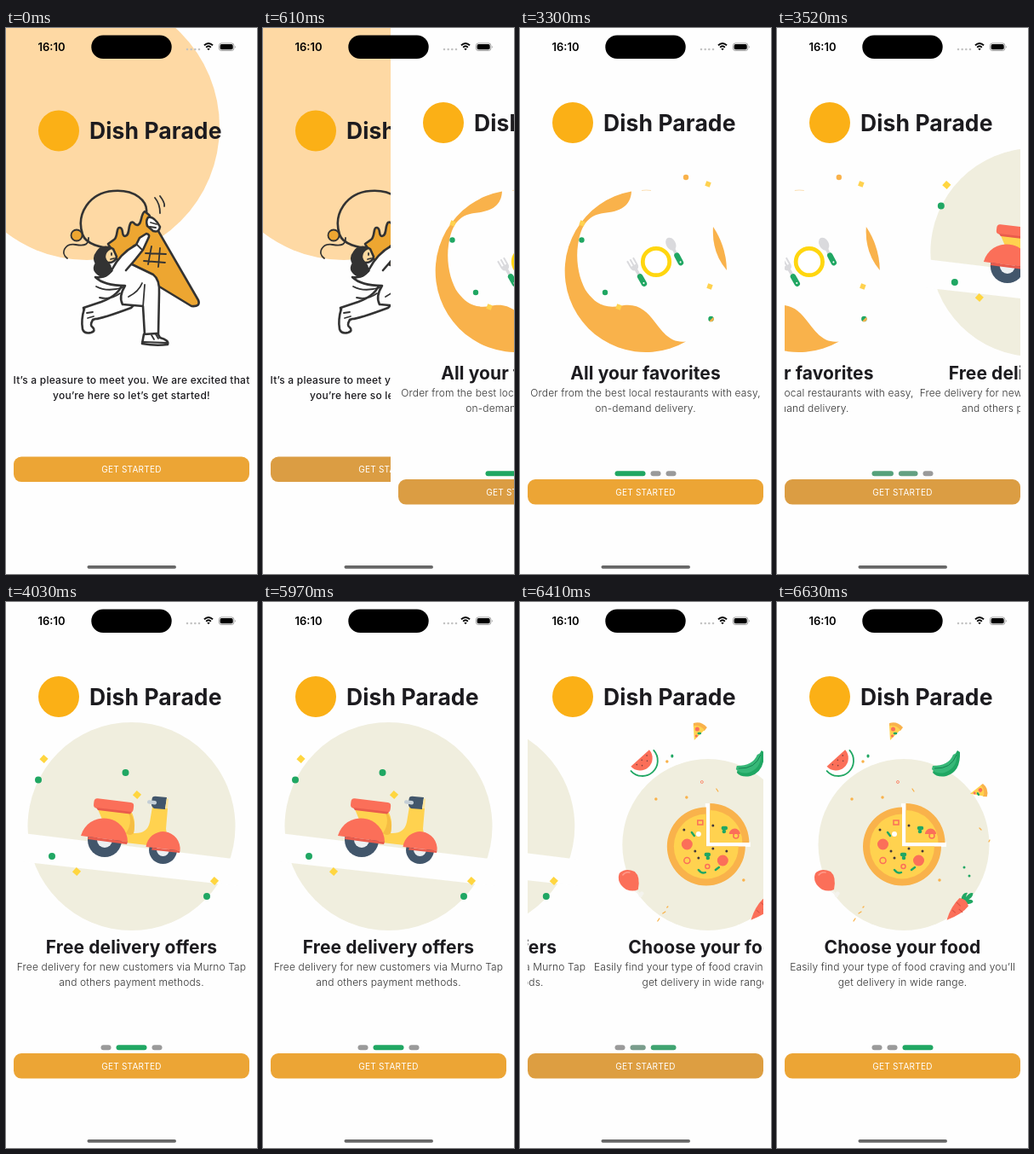
Recreate the animation shown at these times as an HTML page. Size 295 by 640 pixels, loop 8000 ms.

```html
<!DOCTYPE html>
<html lang="en">
<head>
<meta charset="utf-8">
<title>Food ordering onboarding</title>
<style>
html, body { margin: 0; width: 100%; height: 100%; overflow: hidden; background: #fefefe; }
svg { display: block; width: 100vw; height: 100vh; }
text { font-family: Inter, "Liberation Sans", sans-serif; fill: #1c1b1f; }
.mid { text-anchor: middle; }
.brand { font-size: 26.5px; font-weight: 700; letter-spacing: .1px; }
.head { font-size: 21px; font-weight: 700; letter-spacing: .1px; }
.intro { font-size: 12px; font-weight: 500; letter-spacing: .23px; }
.body { font-size: 12px; font-weight: 300; letter-spacing: .14px; fill: #333; }
.cta { font-size: 10px; letter-spacing: .25px; fill: #fff; }
.clock { font-size: 13px; font-weight: 600; fill: #000; }
.ink { fill: none; stroke: #333; stroke-width: 2.6; stroke-linecap: round; stroke-linejoin: round; }
.fine { stroke-width: 1.8; }
.white { fill: #fefefe; }
.cream { fill: #f0eede; }
.yellow { fill: #ffd24f; }
.amber { fill: #f9b24b; }
.green { fill: #20a763; }
.red { fill: #fb6f59; }
.navy { fill: #42566b; }
.dots { fill: none; stroke: #20a763; stroke-linecap: round; }
.dots.a { stroke: #f9b24b; }
</style>
</head>
<body>
<svg viewBox="0 0 295 640" preserveAspectRatio="none">
<defs>
  <clipPath id="view"><rect x="9" y="138" width="277" height="320"/></clipPath>
  <g id="brand">
    <circle cx="62" cy="111" r="24" fill="#fbb016"/>
    <text class="brand" x="98" y="120.500">Dish Parade</text>
  </g>
  <rect id="gem" x="-3.600" y="-3.600" width="7.200" height="7.200" transform="rotate(42)" fill="#ffd640"/>
  <rect id="chip" x="-2.900" y="-2.900" width="5.800" height="5.800" transform="rotate(20)" fill="#ffd24f"/>
  <g id="button">
    <rect class="fill" x="9" width="277" height="29.600" rx="9"/>
    <text class="cta mid" x="147.500" y="18.500">GET STARTED</text>
  </g>
  <g id="wedge">
    <path class="amber" d="M-7-10Q2-13 9-5L6-1-7-6Z"/>
    <path class="yellow" d="M-7-7Q1-8 6-2L-6 10Z"/>
    <path class="dots" stroke-width="2.500" d="M-1 2h2"/>
    <path class="red" d="M-5-3a2.500 2.500 0 1 1 5 0a2.500 2.500 0 1 1-5 0M-5 5a1.500 1.500 0 1 1 3 0a1.500 1.500 0 1 1-3 0"/>
  </g>
</defs>

<g id="home">
  <rect class="white" width="295" height="640"/>
  <circle cx="95" cy="116" r="156" fill="#fed9a4"/>
  <use href="#brand" y="9.500"/>
  <g class="ink">
    <!-- scoop, cone and cherry -->
    <path d="M90 242C82 218 98 193 126 191C152 189 167 203 165 217M90 242C94 254 114 258 124 258"/>
    <path fill="#eda631" d="M163 215C158 218 160 231 154 231C149 230 151 226 147 228C143 232 146 243 140 244C135 244 139 235 134 234C129 233 132 245 127 248Q123 251 120 253L132 274L218 326Q229 327 226 319L168 219Z"/>
    <circle class="fine" cx="83" cy="243" r="6.500" fill="#eda631"/>
    <path class="fine" d="M72 270C63 263 70 252 82 254S97 253 97 246M175 199Q181 206 181 217M181 197Q187 205 186 209"/>
    <path class="fine" d="M171 256L167 277M181 258L179 280M164 264L188 265M162 273L187 275"/>
    <!-- back leg -->
    <path class="white" d="M138 297Q134 313 112 321L91 328L96 344L105 341Q112 341 147 328L164 310"/>
    <path class="white" d="M92 329Q88 342 90 353Q92 359 100 357Q106 355 102 351Q98 349 102 342"/>
    <path class="fine" d="M95 334L102 333M96 340L103 338"/>
    <!-- torso and front leg -->
    <path class="white" d="M124 285C126 278 138 276 148 277L173 289Q181 295 180 311L179 359L163 360L161 326L137 324Q132 315 140 302C122 302 112 299 105 292Q116 294 124 285Z"/>
    <path class="white" d="M162 359L160 370Q176 373 190 371Q192 366 181 363L178 358Z"/>
    <path class="fine" d="M160 368L189 369M171 360L174 365M176 359L179 364"/>
    <path class="fine" d="M106 303Q119 310 138 304M110 316Q123 319 134 311M160 299Q156 309 144 315M163 301L161 327"/>
    <!-- head and arms -->
    <path fill="#fbd9a0" d="M111 263Q118 254 126 259L130 268Q128 276 119 275Z"/>
    <path fill="#333" d="M107 263Q112 254 123 258Q113 263 117 273Q126 280 121 287Q116 294 109 289Q101 283 106 276Q102 269 107 263Z"/>
    <path class="fine" d="M124 264L124 266M123 271L127 270"/>
    <path class="white" d="M124 284Q134 264 153 254L157 246L165 241Q170 242 167 247L161 260Q151 273 141 284"/>
    <path class="white" d="M167 222Q174 220 181 233Q180 240 173 238L166 232Q164 226 167 222Z"/>
    <path class="fine" d="M154 254L160 260M170 228L177 230M169 233L176 234"/>
  </g>
  <g class="intro mid">
    <text x="147.500" y="416.500">It’s a pleasure to meet you. We are excited that</text>
    <text x="147.500" y="434.500">you’re here so let’s get started!</text>
  </g>
  <use href="#button" y="502.500"/>
</g>

<g id="tour">
  <rect class="white" width="295" height="640"/>
  <use href="#brand"/>
  <g clip-path="url(#view)"><g id="strip">

    <g>
      <path class="amber" d="M131 191.500A95 95 0 1 0 195 367.400C176 370 167 355 158 344C149 332 138 321 117 326C96 329 88 321 79 310C70 297 64 272 69 249C73 229 82 219 98 217C118 215 130 209 131 191.500Z"/>
      <path class="amber" d="M227 233A95 95 0 0 1 243 284Q225 263 227 233Z"/>
      <path d="M143 190.500Q148 189.500 154 190.500" fill="none" stroke="#f9c981" stroke-width=".6"/>
      <circle cx="160" cy="274" r="15.700" fill="#fff" stroke="#ffd60f" stroke-width="4.800"/>
      <g transform="translate(138 286) rotate(-30)">
        <path d="M-5-17V-9Q-5-4-1.800-3V4H1.800V-3Q5-4 5-9V-17H3V-9H1V-17H-1V-9H-3V-17Z" fill="#dadadd"/>
        <rect class="green" x="-3.300" y="3" width="6.600" height="16" rx="3.300"/>
        <circle cy="15" r="1" fill="#fff"/>
      </g>
      <g transform="translate(182 262) rotate(-28)">
        <ellipse cy="-10" rx="5.500" ry="8" fill="#dadadd"/>
        <path d="M-1.800-4H1.800V4H-1.800Z" fill="#dadadd"/>
        <rect class="green" x="-3.300" y="2" width="6.600" height="16" rx="3.300"/>
        <circle cy="14" r="1" fill="#fff"/>
      </g>
      <path class="dots" stroke-width="6.400" d="M72.500 248.500h0M100 310h0M224.500 341h0"/>
      <path class="dots a" stroke-width="6.400" d="M195 175h0"/>
      <path class="amber" d="M227 339A3.200 3.200 0 0 1 222.500 343.500Z"/>
      <use href="#chip" transform="translate(221 183)"/>
      <use href="#chip" transform="translate(73 229)"/>
      <use href="#chip" transform="translate(116 327)"/>
      <use href="#chip" transform="translate(223 303)"/>
      <g class="mid">
        <text class="head" x="147.500" y="412">All your favorites</text>
        <text class="body" x="147.500" y="432">Order from the best local restaurants with easy,</text>
        <text class="body" x="147.500" y="450">on-demand delivery.</text>
      </g>
    </g>

    <g transform="translate(277)">
      <circle class="cream" cx="147.500" cy="263" r="122"/>
      <path class="white" d="M20 271L275 302V333L20 304.500Z"/>
      <circle class="navy" cx="116" cy="279" r="20"/>
      <circle cx="116" cy="279" r="9" fill="#eceff1"/>
      <circle class="navy" cx="184.500" cy="290.500" r="16.500"/>
      <circle cx="184.500" cy="290.500" r="7.500" fill="#eceff1"/>
      <path class="yellow" d="M108 243L148 247Q153 257 150 271Q166 272 169 258L172 240L190 242L188 266L190 277L166 285L140 282L116 262Z"/>
      <path d="M146 247Q153 257 150 271Q146 275 141 271Q149 259 144 247Z" fill="#f5bd43"/>
      <path class="red" d="M88 274A28 28 0 0 1 143 281Z"/>
      <path class="red" d="M164.500 287A20 20 0 0 1 204.500 291.500Z"/>
      <path d="M97 275L143 281L142 284L96 278ZM172 288L204.500 291.500L204 294L171 290.500Z" fill="#e95b4c"/>
      <rect class="red" x="103" y="232.500" width="47" height="11.500" rx="4" transform="rotate(7 126 239)"/>
      <path d="M106 241L148 246L146 248.500L108 244Z" fill="#e95b4c"/>
      <path class="navy" d="M172 229Q174 227 178 228L189 229L187 243L174 242Q169 240 172 229Z"/>
      <path d="M189 230L191 231 190 242 187 242Z" fill="#ffe59a"/>
      <rect x="166" y="232.500" width="11" height="4.500" rx="2" transform="rotate(7 171 235)" fill="#c4ced6"/>
      <path class="dots" stroke-width="8" d="M38 208.500h0M140.500 200h0M54 298h0M236 345h0"/>
      <use href="#gem" transform="translate(44.500 184)"/>
      <use href="#gem" transform="translate(154 226)"/>
      <use href="#gem" transform="translate(83 316)"/>
      <use href="#gem" transform="translate(245 327)"/>
      <g class="mid">
        <text class="head" x="147.500" y="412">Free delivery offers</text>
        <text class="body" x="147.500" y="432">Free delivery for new customers via Murno Tap</text>
        <text class="body" x="147.500" y="450">and others payment methods.</text>
      </g>
    </g>

    <g transform="translate(554)">
      <circle class="cream" cx="149" cy="284.500" r="100.500"/>
      <!-- pizza -->
      <path class="white" d="M146 236H151.500V281.500H199V287H146Z"/>
      <path class="amber" d="M147 286.500V240.500A46 46 0 1 0 193 286.500Z"/>
      <path class="yellow" d="M147 286.500V248.500A38 38 0 1 0 185 286.500Z"/>
      <path class="amber" d="M151.500 282V236A46 46 0 0 1 197.500 282Z"/>
      <path class="yellow" d="M151.500 282V244A38 38 0 0 1 189.500 282Z"/>
      <path class="red" d="M118 284a6.500 6.500 0 1 0 13 0a6.500 6.500 0 1 0-13 0M160 303a6.500 6.500 0 1 0 13 0a6.500 6.500 0 1 0-13 0M174 272a6.500 6.500 0 0 1 13 0Z"/>
      <path fill="none" stroke="#fb6f59" stroke-width="1.500" d="M137 256h6v5h-6ZM121 303a3.500 3.500 0 1 0 7 0a3.500 3.500 0 1 0-7 0M146 310a2.500 2.500 0 1 0 5 0a2.500 2.500 0 1 0-5 0M179 274a3 3 0 1 0 6 0a3 3 0 1 0-6 0"/>
      <path class="dots" stroke-width="4.500" d="M167 265h3M168 269h0M147 296h3M149 300h0"/>
      <path class="dots" stroke-width="2.500" d="M138 314Q142 319 146 317M130 270l3 4M158 314l4-3"/>
      <circle cx="138" cy="272" r="3" fill="#fff"/>
      <path fill="none" stroke="#43383a" stroke-width="3" stroke-linecap="round" d="M121 267h0M155 262h0M138 300h0M155 289h0M171 292h0M134 292h0"/>
      <!-- watermelon -->
      <g transform="translate(72 186) rotate(-42)">
        <path class="dots" stroke-width="1.800" d="M-18 0A18 18 0 0 0 18 0"/>
        <path class="red" d="M-14.500-4H14.500A14.500 14.500 0 0 1-14.500-4Z"/>
        <path fill="none" stroke="#743c3c" stroke-width="1.500" stroke-linecap="round" d="M-8-1h0M0-1h0M8-1h0M-4 4h0M4 4h0"/>
      </g>
      <use href="#wedge" transform="translate(139 152)"/>
      <use href="#wedge" transform="translate(238 224) rotate(55) scale(.95)"/>
      <!-- bananas -->
      <path class="green" d="M212 174L215 176Q216 199 199 204Q188 206 183 200L184 197Q207 197 208 181Z"/>
      <path fill="#37b878" d="M211 177Q213 194 197 200Q187 202 182 196L183 192Q202 192 207 179Z"/>
      <path d="M185 195Q205 196 211 179" fill="none" stroke="#168452"/>
      <!-- carrot -->
      <g transform="translate(215 357) rotate(42)">
        <path class="green" d="M-5-8Q-9-15-4-18Q-4-15-2-13Q-3-20 1-22Q4-18 2-13Q6-17 8-14Q7-9 4-8Z"/>
        <path class="red" d="M-7-7Q0-12 7-7Q8 5-1 22Q-8 7-7-7Z"/>
        <path d="M-6-1H0M7 3H1M-4 9H1" fill="none" stroke="#dc5143"/>
      </g>
      <!-- drumstick -->
      <path d="M62 335L69 341Q70 338 73 340Q75 342 72 344Q72 347 69 346Q67 345 68 343L60 337Z" fill="#f4f3ed"/>
      <path class="red" d="M45 318Q52 311 63 316Q70 322 67 337Q61 340 53 337Q41 329 45 318Z"/>
      <path d="M49 320Q52 316 57 317" fill="none" stroke="#ff9989" stroke-width="1.500" stroke-linecap="round"/>
      <!-- crumbs -->
      <path class="dots a" stroke-width="3.500" d="M88 231h0M124 229h0M137 328h0M191 326h0M101 187h0"/>
      <path class="dots a" stroke-width="1.300" d="M159 219l2 3M238 265l2 2M249 281l1-2M96 365l3-2M90 374l2-3M101 358l1-1"/>
      <path class="dots" stroke-width="3" d="M107 180l0 1M220 311h0M226 321h0"/>
      <circle cx="142" cy="211" r="1.500" fill="none" stroke="#fb8c70"/>
      <g class="mid">
        <text class="head" x="147.500" y="412">Choose your food</text>
        <text class="body" x="147.500" y="432">Easily find your type of food craving and you’ll</text>
        <text class="body" x="147.500" y="450">get delivery in wide range.</text>
      </g>
    </g>
  </g></g>
  <g id="pager">
    <rect y="519.300" height="6" rx="3"/><rect y="519.300" height="6" rx="3"/><rect y="519.300" height="6" rx="3"/>
  </g>
  <use href="#button" y="529"/>
</g>

<!-- system chrome -->
<text class="clock" x="37.500" y="27">16:10</text>
<rect x="100.300" y="8.400" width="94.400" height="27.700" rx="13.800"/>
<path d="M213 25h0M217.700 25h0M222.300 25h0M227 25h0" stroke="#c3c3c3" stroke-width="2.600" stroke-linecap="round"/>
<path d="M233 20.300Q238 15.700 243 20.300M235.200 22.700Q238 20 240.800 22.700" fill="none" stroke="#000" stroke-width="1.900"/>
<path d="M236.300 24.300Q238 23 239.700 24.300L238 26.300Z"/>
<rect x="250.400" y="17.900" width="17.500" height="8.600" rx="2.700" fill="none" stroke="#888" stroke-width=".8"/>
<rect x="251.600" y="19.100" width="15.100" height="6.200" rx="1.700"/>
<path d="M269 20.700Q270.500 22.200 269 23.700Z" fill="#888"/>
<rect x="95.500" y="630" width="104.500" height="3.700" rx="1.850" fill="#676767"/>
</svg>

<script>
const LOOP = 8000;
// The screen refreshes only at these moments.
const ticks = [0, 500, 610, 930, 3300, 3410, 3520, 3620, 3730, 3840, 4030,
  5970, 6080, 6200, 6310, 6420, 6520, 6630];
const SLIDE = 505, PAGE = 277;
const tour = document.getElementById("tour");
const strip = document.getElementById("strip");
const fill = document.querySelector("#button .fill");
const pills = [...document.querySelectorAll("#pager rect")];

const clamp = v => Math.max(0, Math.min(1, v));
const easeOut = v => 1 - (1 - clamp(v)) ** 3;
const mix = (a, b, k) => `rgb(${a.map((v, i) => Math.round(v + (b[i] - v) * k))})`;
const shift = (el, x) => el.setAttribute("transform", `translate(${x.toFixed(2)} 0)`);

// Strength of the button highlight after a tap at time `at`.
const press = (t, at) => Math.min(clamp((t - at) / 180), clamp((at + 480 - t) / 160));

function draw(now) {
  const time = now % LOOP;
  const t = ticks.findLast(tick => tick <= time);
  const scroll = easeOut((t - 3431) / SLIDE) + easeOut((t - 6127) / SLIDE);

  shift(tour, t < 610 ? 295 : t < 930 ? 150 : 0);
  shift(strip, -PAGE * scroll);

  const pressed = Math.max(press(t, 400), press(t, 3300), press(t, 5970));
  fill.setAttribute("fill", mix([236, 165, 53], [219, 157, 67], pressed));

  let x = 111.5;
  pills.forEach((pill, i) => {
    const on = clamp(1 - Math.abs(scroll - i));
    const width = 12 + 24 * on;
    pill.setAttribute("x", x);
    pill.setAttribute("width", width);
    pill.setAttribute("fill", mix([154, 154, 154], [32, 167, 99], on));
    x += width + 6;
  });
}

const start = performance.now();
function frame() {
  draw(performance.now() - start);
  requestAnimationFrame(frame);
}
frame();
</script>
</body>
</html>
```
